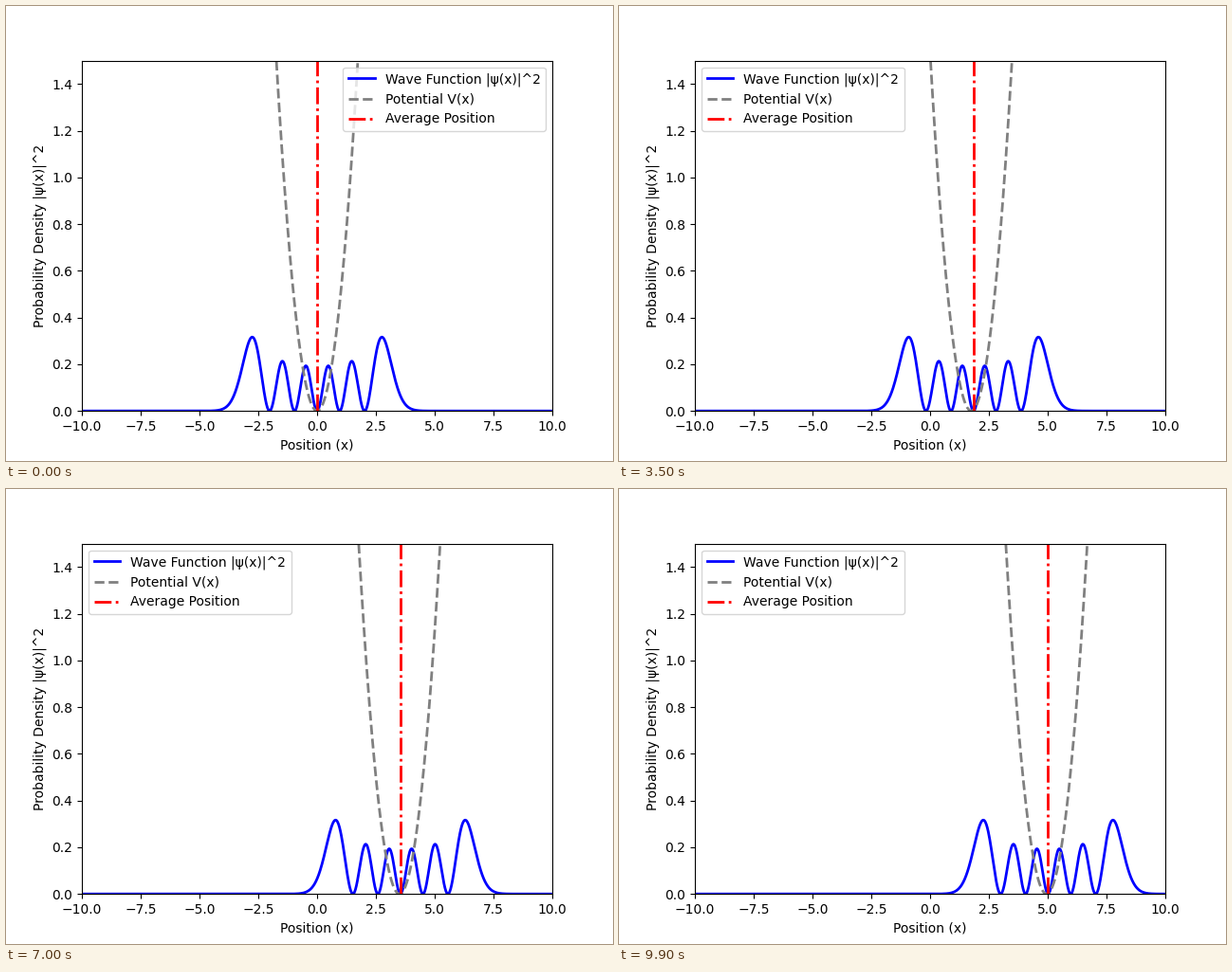
Animation, 640 px wide and 480 px high, one loop 10000 ms. Source, as a matplotlib script:

```python
import math

import matplotlib.pyplot as plt
import numpy as np
from matplotlib.animation import FuncAnimation

FRAMES = 100
INTERVAL = 100   # ms
DT = 0.5         # oscillator time per frame (omega = 1)
SPEED = 0.1      # drift of the trap centre

x = np.linspace(-10, 10, 1000)


def density(u):
    """|psi_5|^2 of the harmonic oscillator."""
    h5 = 32 * u**5 - 160 * u**3 + 120 * u
    norm = 2**5 * math.factorial(5) * math.sqrt(math.pi)
    return h5**2 * np.exp(-u**2) / norm


def potential(u):
    return 0.5 * u**2


fig, ax = plt.subplots(figsize=(6.4, 4.8), dpi=100)
ax.set_xlim(-10, 10)
ax.set_ylim(0, 1.5)
ax.set_xlabel("Position (x)")
ax.set_ylabel("Probability Density |ψ(x)|^2")

wave, = ax.plot(x, density(x), color="blue", lw=2,
                label="Wave Function |ψ(x)|^2")
trap, = ax.plot(x, potential(x), color="gray", ls="--", lw=2,
                label="Potential V(x)")
mean = ax.axvline(0, color="red", ls="-.", lw=2, label="Average Position")
ax.legend(loc="best")


def update(i):
    t = i * DT
    centre = SPEED * t
    # A packet starting at rest lags behind and oscillates about the trap.
    packet = centre - SPEED * math.sin(t)
    wave.set_ydata(density(x - packet))
    trap.set_ydata(potential(x - centre))
    mean.set_xdata([packet, packet])
    return wave, trap, mean


anim = FuncAnimation(fig, update, frames=FRAMES, interval=INTERVAL,
                     repeat=True, repeat_delay=0)
plt.show()
```
